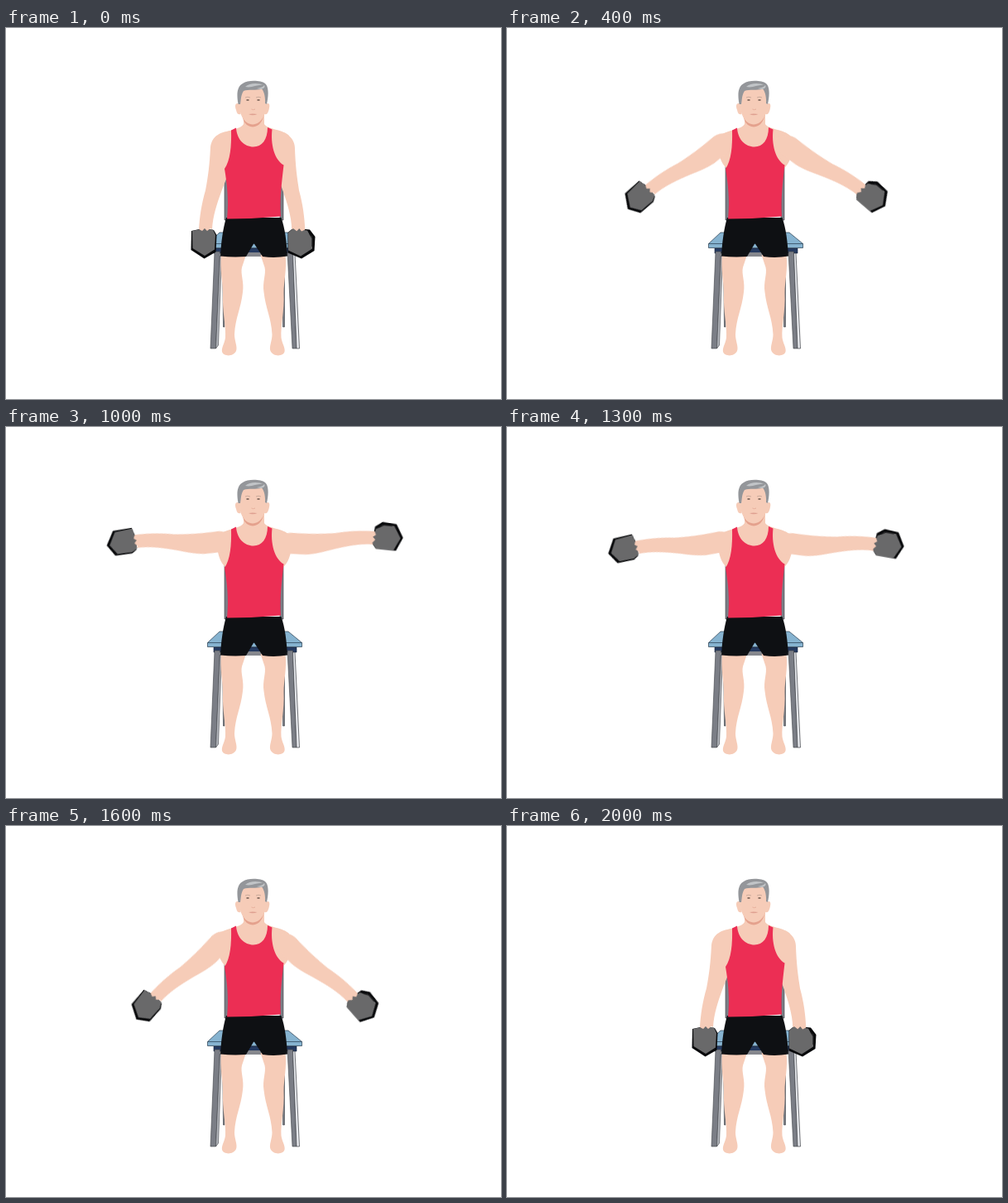
An HTML page that plays this animation: 598 by 448 pixels, repeating every 2500 ms.

```html
<!DOCTYPE html>
<html lang="en">
<head>
<meta charset="utf-8">
<title>Seated lateral raise</title>
<style>
  html, body { margin: 0; width: 100%; height: 100%; overflow: hidden; background: #fff; }
  svg { display: block; width: 100%; height: 100%; }
  .skin { fill: #f6ccb8; }
  .black { fill: #08090b; }
  .grey { fill: #69696a; }
  .metal { fill: #7b7e86; stroke: #3d4046; stroke-width: .6; }
  .arm { animation: lift 2500ms step-end infinite; }
  .left { --swing: 79.5deg; transform-origin: 262px 140px; }
  .right { --swing: 84deg; transform-origin: 260px 138px; }
  @keyframes lift {
    0%, 80%, 100% { transform: rotate(0deg); }
    4%  { transform: rotate(calc(var(--swing) * .075)); }
    8%  { transform: rotate(calc(var(--swing) * .206)); }
    12% { transform: rotate(calc(var(--swing) * .395)); }
    16% { transform: rotate(calc(var(--swing) * .587)); }
    20% { transform: rotate(calc(var(--swing) * .76)); }
    24% { transform: rotate(calc(var(--swing) * .905)); }
    28% { transform: rotate(calc(var(--swing) * .976)); }
    32% { transform: rotate(var(--swing)); }
    48% { transform: rotate(calc(var(--swing) * .99)); }
    52% { transform: rotate(calc(var(--swing) * .95)); }
    56% { transform: rotate(calc(var(--swing) * .85)); }
    60% { transform: rotate(calc(var(--swing) * .69)); }
    64% { transform: rotate(calc(var(--swing) * .49)); }
    68% { transform: rotate(calc(var(--swing) * .31)); }
    72% { transform: rotate(calc(var(--swing) * .15)); }
    76% { transform: rotate(calc(var(--swing) * .04)); }
  }
</style>
</head>
<body>
<svg viewBox="0 0 598 448">
  <defs>
    <path id="limb" d="M274 124C259 125 249 130 247 144C246 165 244 180 241 196C236 213 234 228 233 243L237 245L240 242L243 245L247 242L249 243C250 226 255 212 260 198C265 185 269 176 271 164Z"/>
    <path id="leg" d="M260 274C258 292 262 306 262 320C261 342 266 360 265 374C264 381 260 386 261 391C263 397 275 397 278 390C280 385 276 378 276 370C277 350 284 338 286 319C288 307 283 297 285 289L290 274Z"/>
  </defs>

  <!-- chair -->
  <g>
    <path class="metal" d="M264 166H268.500V232H264ZM331 166H335V232H331Z"/>
    <path class="metal" d="M261.500 276H263L264 361H262.500ZM335 276H336.500V361H334.500Z"/>
    <path d="M251 266H351V272H251Z" fill="#253a60" stroke="#14203a" stroke-width=".6"/>
    <path d="M284 271H316V276H284Z" fill="#85878d"/>
    <path d="M258 247H341L357.500 260.500V265.500H243.500V260.500Z" fill="#86b3d0" stroke="#263a4c" stroke-width=".7"/>
    <path d="M243.500 260.500H357.500" stroke="#263a4c" stroke-width=".7"/>
    <path class="metal" d="M252 270H258.500L253.500 387H247Z"/>
    <path d="M258.500 275H260.500L256.500 383L253.500 387Z" fill="#b4b7bd" stroke="#3d4046" stroke-width=".6"/>
    <path class="metal" d="M340 270H346.500L351 387H346Z"/>
    <path d="M346.500 272H349L354.500 387H351Z" fill="#e6e8ec" stroke="#3d4046" stroke-width=".7"/>
  </g>

  <!-- legs, neck and shoulders -->
  <g class="skin">
    <use href="#leg"/>
    <use href="#leg" transform="matrix(-1 0 0 1 597.500 0)"/>
    <path d="M287 104V116C284 122 270 123 260 128L256 151C258 161 262 167 267 171H333C338 167 342 161 344 151L342 130C336 123 315 122 312 116V104Z"/>
  </g>

  <!-- arms with dumbbells -->
  <g class="arm left">
    <path class="black" d="M224 245L238 242L251 244L254.500 250L253.500 270.500L239.500 278.500L223.500 268Z"/>
    <path class="grey" d="M225 245L238 242.500L250 243.500L253 250L252 267.500L240 275L225.500 266Z"/>
    <use class="skin" href="#limb"/>
  </g>
  <g transform="matrix(-1 0 0 1 598 0)">
    <g class="arm right">
      <path class="black" d="M257.500 247L251 241.500L231 243.500L224.500 252L225.500 269L241 278.500L257.500 271.500Z"/>
      <path class="grey" d="M257 247L251 242L234 244.500L231 250L228 252L228 266.500L242 275.500L257 268.500Z"/>
      <path d="M231 249L228 254V264" fill="none" stroke="#1a1a1c" stroke-width="1.300"/>
      <use class="skin" href="#limb" transform="translate(2 0) rotate(-1 262 140)"/>
    </g>
  </g>

  <!-- clothes -->
  <path fill="#0e1013" d="M266 229H332.500C337 242 339 258 340 275.500Q325 278 310 276L299.500 260L290 276Q274 277 259 275.500C260 258 262 243 266 229Z"/>
  <path fill="#ec2e54" d="M272 123.500L278 120.500C279 135 288 143.500 299 143.500C309 143.500 316 135 316 120L321.500 122.500C319.500 140 324 159 335.500 165.500C333 187 330.500 207 332 227.500Q300 230.500 267 230.500C269.500 208 267 188 264 170C271 160 272.500 143 272 123.500Z"/>

  <!-- head -->
  <g transform="translate(-1 0)">
    <path fill="#e4a18d" d="M286 103C287 113 291 119 299 119.500C307 119 311 113 313 103Z"/>
    <path class="skin" d="M283 92C278 89 277 94 279 99C280 104 282 105 284.500 104ZM314.500 92C320 89 320 94 318.500 99C317 104 315.500 105 313 104Z"/>
    <path class="skin" d="M283 74H315V96C314 108 307 116.500 299 116.500C291 116.500 284 108 283 96Z"/>
    <path fill="#94969a" d="M281.500 92C279 78 281 70 287 67C293 62.500 309 63 314 67C319 71 318 83 316 92L314 91C314.500 84 313 77 310 73.500C303 76 294 73.500 288 76C284.500 81 285 87 284 92Z"/>
    <path fill="#c1c4c7" d="M290 71C295 66 306 66 312 69C304 68 298 73 290 71ZM304 73C309 72 312 71 313 69C315 72 311 75 304 73Z"/>
    <path d="M290 84Q292.500 82.500 296 84M303 84Q306 82.500 309 84" fill="none" stroke="#c9aa9b" stroke-width="1"/>
    <path d="M291.500 87H294.500M304.500 87H307.500" fill="none" stroke="#6d574c" stroke-width="1.500"/>
    <path d="M297.500 98Q299.500 99.500 302 98" fill="none" stroke="#e7b19d" stroke-width="1"/>
    <path d="M294 104Q299 103 304.500 104Q299 106.500 294 104Z" fill="#dfa091"/>
  </g>
</svg>
</body>
</html>
```
